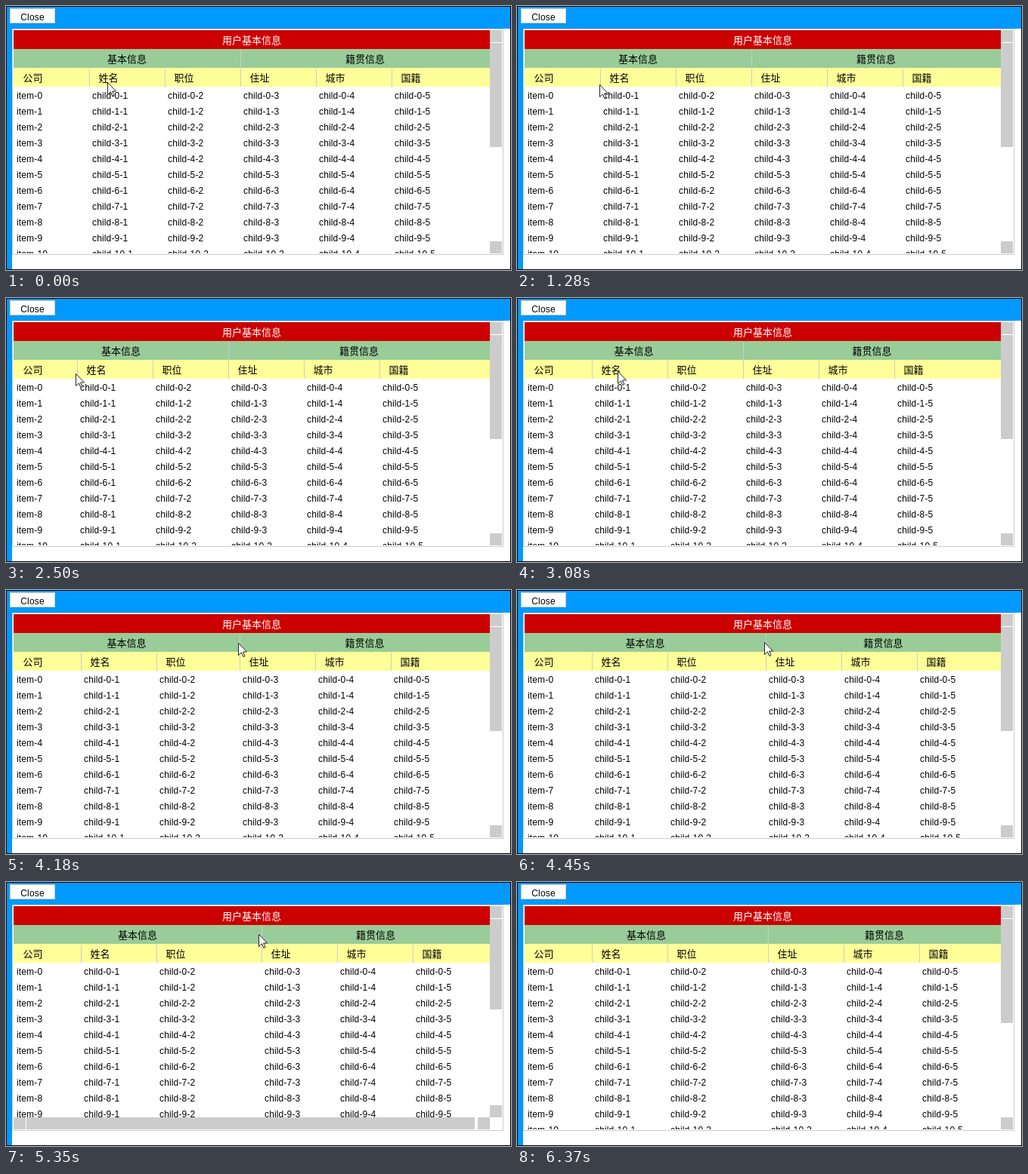
An HTML page that plays this animation: 668 by 350 pixels, repeating every 6.4 s.

```html
<!DOCTYPE html>
<html lang="zh">
<head>
<meta charset="utf-8">
<title>Resizable table columns</title>
<style>
  html, body { margin: 0; width: 100%; height: 100%; overflow: hidden; background: #fff; }
  svg { display: block; }
  text { font: 12px "Liberation Sans", Arial, sans-serif; letter-spacing: .15px; fill: #000; }
  .cjk { font: 13px "Noto Sans CJK SC", "Noto Sans CJK", sans-serif; letter-spacing: 0; }
  .mid { text-anchor: middle; }
  .gray { fill: #ccc; }
</style>
</head>
<body>
<svg id="stage" width="668" height="350" viewBox="0 0 668 350">
  <defs>
    <clipPath id="view"><rect id="viewBox" x="10" y="107" width="630"/></clipPath>
  </defs>
  <rect width="668" height="350" fill="#09f"/>
  <rect x="8" y="30" width="660" height="320" fill="#fff"/>
  <rect x="5.5" y="3.5" width="59" height="19" fill="#fff" stroke="#ccc"/>
  <text class="mid" x="35" y="19">Close</text>
  <rect x="8.5" y="30.5" width="649" height="299" fill="#fff" stroke="#ccc"/>
  <rect x="10" y="32" width="630" height="25" fill="#c00"/>
  <rect x="10" y="57" width="630" height="25" fill="#9c9"/>
  <rect x="10" y="82" width="630" height="25" fill="#ff9"/>
  <text class="cjk mid" x="325" y="50" style="fill:#fff">用户基本信息</text>
  <text class="cjk mid" id="basic" y="75">基本信息</text>
  <text class="cjk mid" id="origin" y="75">籍贯信息</text>
  <rect class="gray" id="split" y="58" width="1" height="25"/>
  <g id="heads"></g>
  <g clip-path="url(#view)"><g id="body"></g></g>
  <g class="gray">
    <rect x="640" y="32" width="16" height="16"/>
    <rect id="vThumb" x="640" y="49" width="16"/>
    <rect id="vEnd" x="640" width="16" height="16"/>
    <g id="hBar">
      <rect x="10" y="312" width="16" height="16"/>
      <rect id="hThumb" x="27" y="312" height="16"/>
      <rect x="624" y="312" width="16" height="16"/>
    </g>
  </g>
  <rect x=".5" y=".5" width="667" height="349" fill="none" stroke="#000"/>
  <path id="cursor" d="M.5 .5V16.5L4.4 12.9L6.9 18.5L9 17.5L6.6 12H11.5Z" fill="#fff" stroke="#222"/>
</svg>
<script>
const LOOP = 6400, STEP = 30, LEFT = 10, HIDE = 6370;
const $ = id => document.getElementById(id);
const sum = list => list.reduce((a, b) => a + b, 0);

function set(id, attrs) {
  for (const name in attrs) $(id).setAttribute(name, attrs[name]);
}

function add(parent, tag, attrs, label = "") {
  const el = document.createElementNS("http://www.w3.org/2000/svg", tag);
  for (const name in attrs) el.setAttribute(name, attrs[name]);
  el.textContent = label;
  return parent.appendChild(el);
}

// Each column is a header group and a body group, moved sideways together.
const columns = ["公司", "姓名", "职位", "住址", "城市", "国籍"].map((title, c) => {
  const head = add($("heads"), "g", {});
  const body = add($("body"), "g", {});
  if (c) add(head, "rect", { class: "gray", y: 83, width: 1, height: 24 });
  add(head, "text", { class: "cjk", x: 12.5, y: 100 }, title);
  for (let r = 0; r < 11; r++)
    add(body, "text", { x: 4, y: 123 + 21 * r }, c ? `child-${r}-${c}` : `item-${r}`);
  return [head, body];
});

// The cursor eases from where it is to (x, y). While dragging, the right
// edge of a column follows it at a fixed distance, the grip.
const moves = [];
const go = (from, to, x, y) => moves.push({ from, to, x, y });
const drag = (col, grip, from, to, x, y) => moves.push({ from, to, x, y, col, grip });

go(100, 100, 131, 102);
go(500, 1130, 109, 104);
drag(0, 6, 1590, 2070, 89, 100);
drag(0, 2, 2440, 2710, 97, 100);
go(3080, 3080, 133, 97);
go(3110, 3620, 300, 70);
drag(2, 2, 4180, 4180, 307, 70);
drag(2, 2, 4210, 4870, 347, 68);
drag(2, 4, 5050, 5620, 328, 70);
go(5830, 5920, 352, 79);
go(6100, 6340, 624, 104);

// Share of a move done, in whole steps; the first step shows at once.
function progress(move, t) {
  const steps = Math.floor((t - move.from) / STEP) + 1;
  const u = Math.min(1, steps / ((move.to - move.from) / STEP + 1));
  return 1 - (1 - u) ** 1.35;
}

function pose(t) {
  let x = 134, y = 101;
  const widths = columns.map(() => 100);
  for (const m of moves) {
    if (t < m.from) break;
    const f = progress(m, t);
    x = Math.round(x + (m.x - x) * f);
    y = Math.round(y + (m.y - y) * f);
    if (m.grip) widths[m.col] = x + m.grip - LEFT - sum(widths.slice(0, m.col));
  }
  return { x, y, widths };
}

function draw(t) {
  const { x, y, widths } = pose(t);
  columns.forEach((parts, c) => {
    const left = LEFT + sum(widths.slice(0, c));
    for (const g of parts) g.setAttribute("transform", `translate(${left})`);
  });
  const split = LEFT + sum(widths.slice(0, 3));
  const total = sum(widths);
  const bar = total > 624;
  const bottom = bar ? 312 : 328;

  set("split", { x: split });
  set("basic", { x: (LEFT + split) / 2 });
  set("origin", { x: (split + 640) / 2 });
  set("viewBox", { height: bottom - 107 });
  set("vThumb", { height: bar ? 120 : 138 });
  set("vEnd", { y: bottom - 16 });
  set("hBar", { visibility: bar ? "visible" : "hidden" });
  set("hThumb", { width: Math.min(596, 1221 - total) });
  set("cursor", {
    transform: `translate(${x} ${y})`,
    visibility: t < HIDE ? "visible" : "hidden"
  });
}

const begin = performance.now();
function tick() {
  draw((performance.now() - begin) % LOOP);
  requestAnimationFrame(tick);
}
tick();
</script>
</body>
</html>
```
